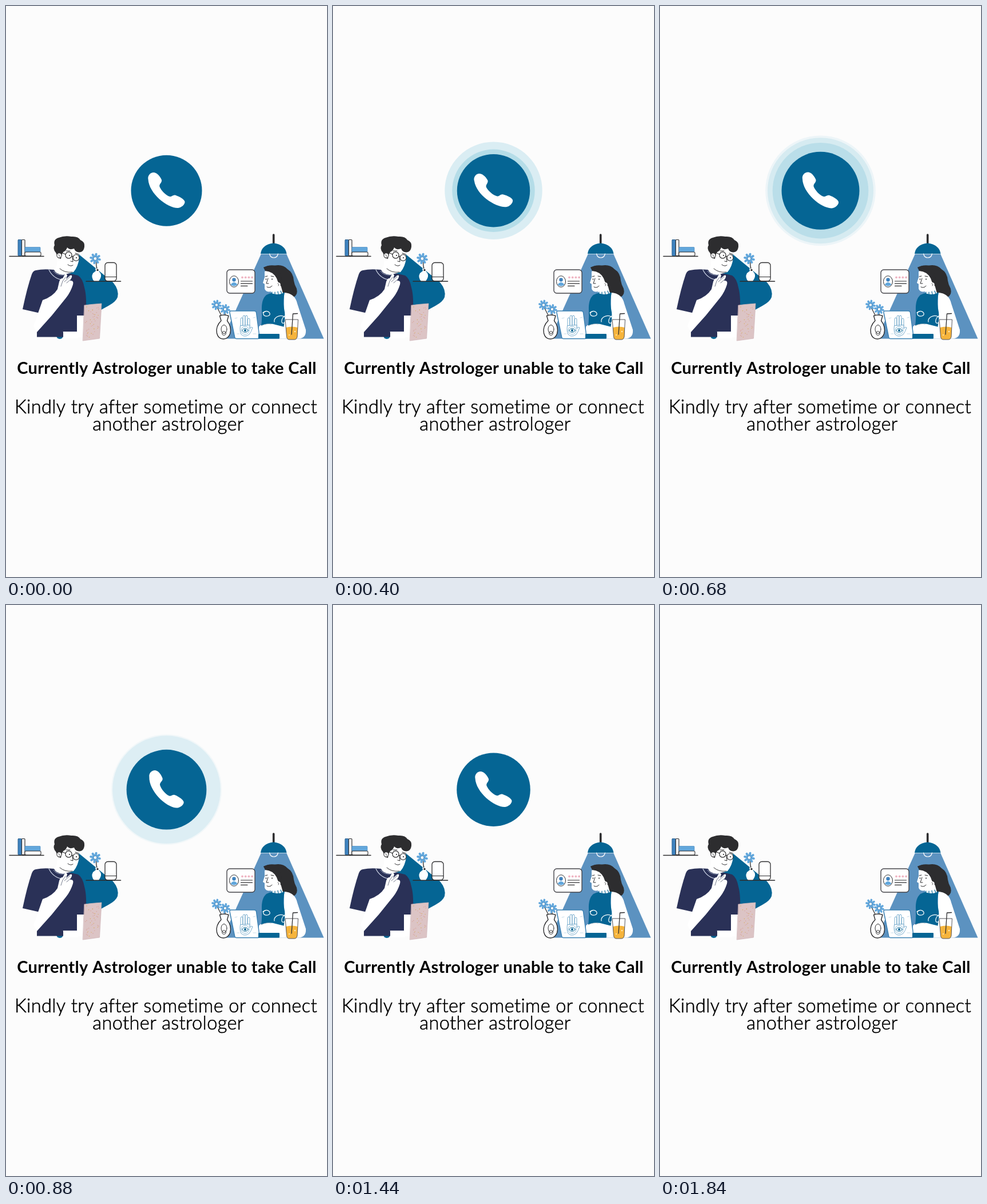
An HTML page with a canvas that plays this animation: 561 by 998 pixels, repeating every 3 s.

```html
<!DOCTYPE html>
<html lang="en">
<head>
<meta charset="utf-8">
<title>Call unavailable</title>
<style>
  html, body { margin: 0; width: 100%; height: 100%; overflow: hidden; background: #fcfcfc; }
  canvas { display: block; }
</style>
</head>
<body>
<canvas id="stage" width="561" height="998"></canvas>
<script>
const ctx = document.getElementById('stage').getContext('2d');
const LOOP = 3000, STEP = 40;
const PAPER = '#fcfcfc', WHITE = '#ffffff', INK = '#2d2d2f';
const TEAL = '#056594', NAVY = '#2a3157', SKY = '#62a7dc', BEAM = '#5c92c0';
const CENTER = { x: 280.5, y: 322.7 };

function paint(fill, stroke, width) {
  if (fill) { ctx.fillStyle = fill; ctx.fill(); }
  if (stroke) { ctx.strokeStyle = stroke; ctx.lineWidth = width; ctx.stroke(); }
}

function shape(d, fill, stroke, width = 1.3) {
  const path = new Path2D(d);
  if (fill) { ctx.fillStyle = fill; ctx.fill(path); }
  if (stroke) { ctx.strokeStyle = stroke; ctx.lineWidth = width; ctx.stroke(path); }
}

const line = (d, color = INK, width = 1.3) => shape(d, null, color, width);

function oval(x, y, rx, ry, fill, stroke, width = 1.3) {
  ctx.beginPath();
  ctx.ellipse(x, y, rx, ry, 0, 0, Math.PI * 2);
  paint(fill, stroke, width);
}

const disc = (x, y, r, fill, stroke, width) => oval(x, y, r, r, fill, stroke, width);

function box(x, y, w, h, r, fill, stroke, width = 1.3) {
  ctx.beginPath();
  ctx.roundRect(x, y, w, h, r);
  paint(fill, stroke, width);
}

function flower(x, y, r) {
  for (let i = 0; i < 8; i++) {
    const a = i * Math.PI / 4 + 0.2;
    line(`M${x} ${y}L${x + r * 0.8 * Math.cos(a)} ${y + r * 0.8 * Math.sin(a)}`, SKY, r * 0.4);
  }
  disc(x, y, r * 0.52, SKY);
  disc(x, y, r * 0.3, WHITE, '#3579ad', 0.8);
}

function drawShelves() {
  box(21, 408.5, 6.5, 28, 1, '#3f83bf', '#245a88', 0.9);
  box(27.5, 408.5, 5.5, 28, 1, WHITE, INK, 1.2);
  box(33, 421.5, 27, 8.5, 1, SKY, '#4b8cc0', 0.7);
  box(33, 430, 28, 7, 2, WHITE, INK, 1.1);
  line('M6 437.5H66', INK, 1.5);
}

function drawMan() {
  shape('M126 433L187 483Q198 496 195 509Q192 517 179 524L137 547L100 520L98 465Z', TEAL);
  disc(94, 576, 6, TEAL);

  // vase and jar on the right shelf
  line('M158 447Q157 454 160 463');
  flower(156, 441.5, 10);
  shape('M156 459H163L162.5 464Q168 469 165 476L162 481H154Q148 474 152 467L157 463Z', WHITE);
  disc(160, 461.5, 1.7, INK);
  box(173, 448.5, 20, 32.5, 5, WHITE, INK);
  line('M173 473.5H193', INK, 1);
  line('M140 481.3H200.5', INK, 1.5);

  // shirt
  shape('M52 462Q65 459 84 461L126 471Q134 476 137 492Q142 510 139 541H124V569H100V578.5H54V569L65 549L60 537L29 530Q37 492 45 469Q47 463 52 462Z', NAVY);
  // neck and face
  shape('M89 441Q91 454 84 461Q87 469 100 470L118 465Q126 456 128 440L126 428L104 420L92 430Z', WHITE);
  line('M75 461Q82 476 99 479', '#d5dceb', 1.1);
  line('M83 463Q88 472 103 470', '#a2adc4', 0.9);
  // forearm and hand
  shape('M64 514Q82 508 90 495L93 482Q95 475 99 476L103 469Q106 467 107 471L105 477L112 471Q116 469 115 474L112 480Q119 479 117 487Q113 500 105 510L80 541L54 570L48 560L57 534Z', WHITE);
  line('M96 490L99 481L104 474M102 482L112 473M106 484L113 478', '#555c73', 0.8);

  // hair
  shape('M90 440Q89 434 87 431Q81 424 85 418Q82 408 92 405Q102 401 114 403Q126 402 130 409Q138 412 137 421Q136 430 128 430.5Q121 430 119 424Q111 427 107 422Q105 428 100 430Q97 434 96 442Z', INK);
  disc(93, 436, 4.2, WHITE, INK, 1);
  line('M91.5 435Q94 434 94 438', INK, 0.8);
  // features
  disc(109.5, 435.5, 5.6, null, INK, 1.2);
  disc(122.5, 440, 5.5, null, INK, 1.2);
  line('M97 431L104 434M115 437L117 438M105 428L112 428M121 432L127 434', INK, 1.1);
  disc(111, 436, 1.1, INK);
  disc(123, 440, 1.1, INK);
  line('M116 438L117 447L113 446M108 452Q113 456 117 453', INK, 1);
  line('M94 459Q103 467 116 465', INK, 0.9);

  // book and speckled folder
  box(124, 541, 14, 38, 0, WHITE);
  box(100, 569, 26, 12, 0, WHITE);
  line('M100 569.5H124', '#e2e3ea', 0.7);
  shape('M137 523Q152 521 167 520L163.5 581Q150 583 134.5 585Z', '#dcc4c5', '#cdb3b8', 0.7);
  for (let i = 0; i < 42; i++) {
    const v = (i * 0.618) % 1, u = (i * i * 0.377 + 0.1) % 1;
    disc(138.5 - v * 2 + u * 25, 526 + v * 54, 0.65, i % 3 ? '#d79a8f' : '#d7a84e');
  }
}

function drawLampAndCard() {
  shape('M446 433H490L555.5 581.5H379Z', BEAM);
  line('M467.7 400V417', INK, 3.6);
  shape('M445 433Q447 417 467.5 414.5Q488 417 490.5 433Z', TEAL);
  line('M446 433.5H490', '#cfe0ec', 0.9);
  line('M460.5 433Q462 440 468 440Q474 440 475.5 433', WHITE, 1.2);

  box(386, 461, 49, 41, 5, WHITE, '#444449', 1.4);
  oval(398.5, 481.5, 8, 9.8, WHITE, INK, 1);
  disc(398.5, 478.5, 3.2, '#3f83bf');
  shape('M392.5 487Q398.5 479 404.5 487Q398.5 492 392.5 487Z', SKY);
  for (let x = 413; x < 433; x += 5.7) disc(x, 474.3, 1.9, '#efb5c3');
  line('M410.5 481H430.5M410.5 485.2H430.5M410.5 489.3H422', INK, 1.2);
}

function drawWoman() {
  shape('M450 457Q458 452 470 453.5Q484 451 492 460Q502 466 503 480Q504 487 508 494Q511 505 502 509Q495 510 488 506L479 496L467 468Z', INK);
  shape('M486 501Q505 502 509 520L524 566Q525 581 511 581.5H478L443 572L444 558L485 555Z', WHITE);
  shape('M455 505Q470 498 487 501Q484 513 486 529Q489 542 486 557L484 573L444 573Q448 551 447 532Q446 513 455 505Z', TEAL);
  // face and neck
  shape('M452 464Q460 459 468 465Q479 476 481 491L484 502Q475 506 464 502L463 499Q454 501 452 494L452 486L449 484L452 474Z', WHITE);
  shape('M450 457Q463 451 474 457Q482 466 483 492Q476 486 473 476Q467 464 453 463Z', INK);
  disc(476, 487, 3.7, WHITE);
  line('M475 485Q478 486 476 489', INK, 0.8);
  line('M465 500L464 504M470 500V504M475 499L476 504M480 498L482 503', TEAL, 1.2);
  disc(454.5, 477.5, 1, INK);
  disc(465, 477.5, 1, INK);
  line('M453 473L457 472M463 472L468 473M458 476L455 485L459 485M456 491Q461 494 465 489', INK, 1);
  // sleeve drawing and folded arms
  line('M449 536C457 528 467 540 457 542C449 543 447 535 454 534M469 552C467 541 486 538 489 546C491 555 480 558 482 549Q484 541 492 540', WHITE, 1.2);
  shape('M442 560Q458 553 471 557L491 562L490 573H442Z', WHITE);
  line('M446 559Q456 554 463 556', '#9aa5b2', 0.7);
}

function drawTablet() {
  shape('M393 533H434Q437 533 437.5 536L443 578Q443 581.5 440 581.5H403Q400 581.5 399.5 578L391 536Q390.5 533 393 533Z', WHITE, '#3c82b4', 1.5);
  const tint = '#6ca5c9';
  for (let i = 0; i < 4; i++) {
    const top = 541 + [4, 0, 0, 5][i];
    box(410 + i * 4.1, top, 3.7, 566 - top, 2, WHITE, tint, 0.9);
  }
  shape('M409.5 559Q408 568 411 574Q417 580 425 574Q429 569 431 562Q428 560 426 564V558Z', WHITE, tint, 0.9);
  disc(418, 567, 7, null, '#8dbcd8', 1);
  oval(418, 567, 5, 3.3, WHITE, TEAL, 1);
  disc(418, 567, 2, TEAL);
  line('M400 546L404 545M432 545L436 544M404 573L408 573M432 573L437 573', '#b8d3e4', 0.8);
}

function drawDesk() {
  line('M368 525L378 544M383 532L383 545', INK, 1.2);
  flower(368, 522.5, 9);
  flower(383, 530, 9);
  shape('M373.5 541.5Q381 538.5 389 541.5L386.5 550Q395 561 391.5 573Q388 582 380 582Q371 582 368.5 572Q366 560 376 550Z', WHITE, INK, 1.4);
  oval(381, 565, 5, 7.5, null, INK, 1);
  disc(381, 572, 3.5, null, INK, 0.9);
  drawTablet();

  box(441, 573, 37, 8.5, 1, TEAL);
  shape('M488.5 548H510.5L509 578Q508 583 504 583H495Q491 583 490.5 578Z', WHITE);
  shape('M489 562Q500 559 510 562L509 578Q508 583 504 583H495Q491 583 490.5 578Z', '#f6b43c');
  line('M488.5 548H510.5L509 578Q508 583 504 583H495Q491 583 490.5 578Z', '#54545a', 1);
  line('M499 574L501.5 538L509.5 537.5', INK, 1.3);
  disc(505, 569, 1.2, '#fff0c4');
  disc(495, 575, 1, '#fff0c4');
}

function label(text, x, y, font, spacing, outline = 0) {
  ctx.font = font;
  ctx.letterSpacing = spacing;
  ctx.textAlign = 'center';
  ctx.fillStyle = ctx.strokeStyle = '#000';
  ctx.fillText(text, x, y);
  if (!outline) return;
  ctx.lineWidth = outline;
  ctx.strokeText(text, x, y);
}

function drawText() {
  label('Currently Astrologer unable to take Call', 281, 642.5, '700 29px Lato, sans-serif', '0.33px');
  const light = '300 32.6px Lato, sans-serif';
  label('Kindly try after sometime or connect', 279.5, 711.5, light, '0.36px', 0.6);
  label('another astrologer', 283.5, 741.5, light, '0.36px', 0.6);
}

function drawRing(age) {
  if (age <= 0 || age >= 720) return;
  const p = Math.min(age / 560, 1);
  const radius = 62 + 34.5 * (1 - (1 - p) ** 2);
  disc(CENTER.x, CENTER.y, radius, `rgba(79,174,202,${0.3 * (1 - age / 720)})`);
}

function drawCall(t) {
  if (t >= 1840) return;
  const age = Math.max(0, t - 160);
  for (const delay of [0, 150, 300]) drawRing(age - delay);

  const swell = Math.sin(Math.PI * Math.min(age / 1560, 1)) ** 2;
  disc(CENTER.x, CENTER.y, 62 + 8 * swell, TEAL);

  const tilt = age < 960 ? -5 * Math.sin(2 * Math.PI * age / 960) : 0;
  ctx.save();
  ctx.translate(CENTER.x, CENTER.y);
  ctx.rotate(tilt * Math.PI / 180);
  ctx.translate(-CENTER.x, -CENTER.y);
  shape('M248.5 303C247 296 253 290 259 291C265 292 270 299 272 304C273 309 267 311 268.5 316C271 322 279 331 286 333C290 334 292 329 297 331C303 333 312 338 312.5 342C313 347 306 353 300 353C282 353 250 328 248.5 303Z', WHITE);
  ctx.restore();
}

function render(now) {
  const t = Math.floor((now % LOOP) / STEP) * STEP;
  ctx.fillStyle = PAPER;
  ctx.fillRect(0, 0, 561, 998);
  drawCall(t);
  drawShelves();
  drawMan();
  drawLampAndCard();
  drawWoman();
  drawDesk();
  drawText();
}

ctx.lineCap = ctx.lineJoin = 'round';
const start = performance.now();
function tick() {
  render(performance.now() - start);
  requestAnimationFrame(tick);
}
tick();
</script>
</body>
</html>
```
